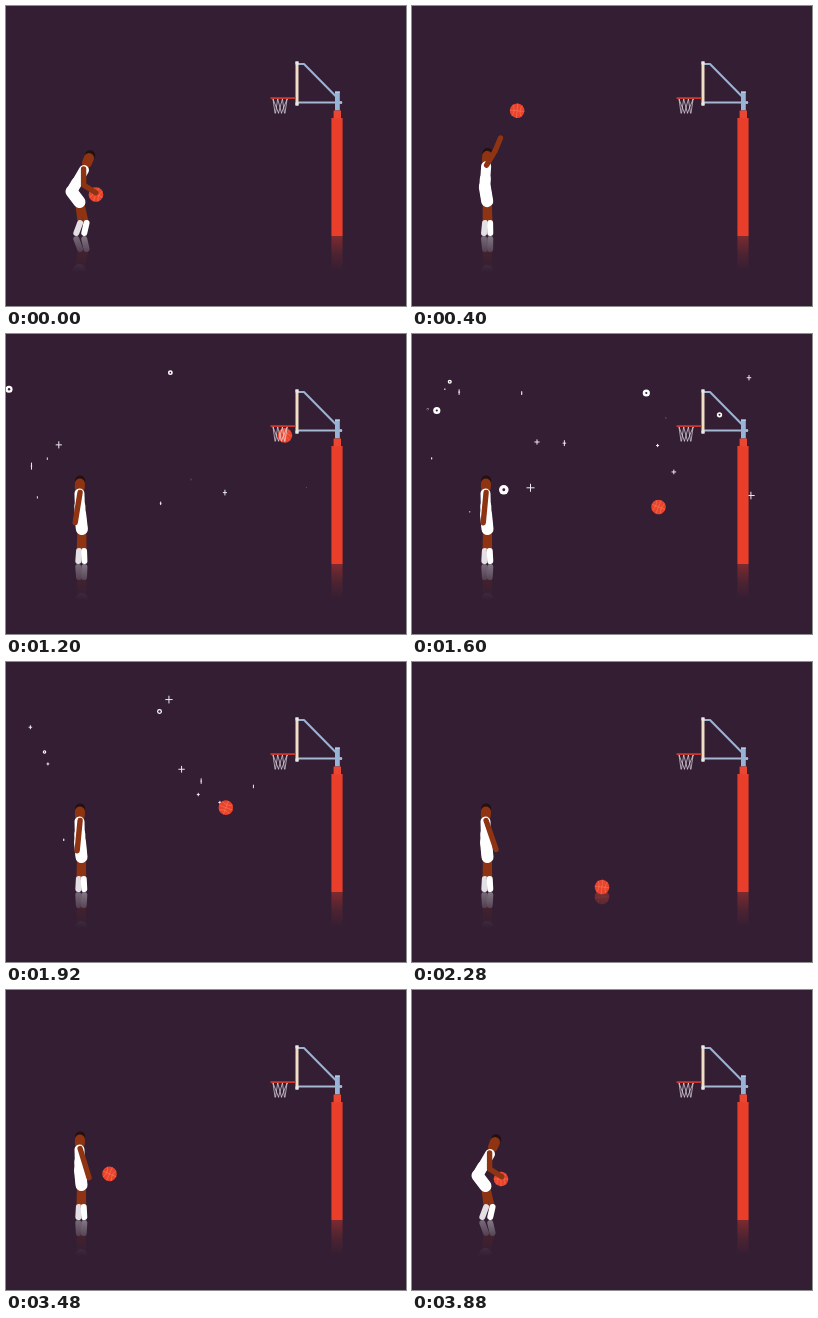
These frames come from a looping animation (400 px wide and 300 px high, 3.96 s). An HTML page with a canvas:

```html
<!DOCTYPE html>
<html lang="en">
<head>
<meta charset="utf-8">
<title>Free throw</title>
<style>
html, body { margin: 0; width: 100%; height: 100%; overflow: hidden; background: #331e33; }
canvas { display: block; width: 400px; height: 300px; }
</style>
</head>
<body>
<canvas id="stage" width="400" height="300"></canvas>
<script>
const ctx = document.getElementById('stage').getContext('2d');
const LOOP = 3960, STEP = 40, FLOOR = 230;
const RELEASE = 340, HIT = 1185, LAND = 1430, CATCH = 3560;
const GRAVITY = .0009;
const BG = '#331e33', RED = '#e83e2a', SKIN = '#8f3413', HAIR = '#24100f';
const WHITE = '#ffffff', STEEL = '#97b3d6';

const mix = (a, b, k) => a + (b - a) * k;
// Eased 0 to 1 between two times.
function ramp(t, from, to) {
  const k = Math.max(0, Math.min(1, (t - from) / (to - from)));
  return k * k * (3 - 2 * k);
}

function stroke(color, width, points, cap = 'round') {
  ctx.strokeStyle = color;
  ctx.lineWidth = width;
  ctx.lineCap = cap;
  ctx.lineJoin = 'round';
  ctx.beginPath();
  points.forEach(([x, y]) => ctx.lineTo(x, y));
  ctx.stroke();
}

function rect(color, x, y, w, h) {
  ctx.fillStyle = color;
  ctx.fillRect(x, y, w, h);
}

function disc(color, x, y, r) {
  ctx.fillStyle = color;
  ctx.beginPath();
  ctx.arc(x, y, r, 0, Math.PI * 2);
  ctx.fill();
}

function armAngle(t) {
  const lowered = ramp(t, 480, 800);
  const raised = ramp(t, 60, RELEASE) * (1 - lowered);
  const swing = Math.cos((t - 2280) / 1120 * Math.PI * 2) * ramp(t, 1500, 2200);
  const rest = -.16 * lowered * (1 - ramp(t, 1200, 2000));
  return (2.6 * raised + rest + .33 * swing) * (1 - ramp(t, 3480, 3760));
}

function drawPlayer(t) {
  const crouch = 1 - ramp(t, 80, 500) + ramp(t, 3480, 3760);
  const sway = ramp(t, 400, 760) * (1 - ramp(t, 840, 1280));
  // A standing joint, with its shift when crouching and when swaying.
  const joint = (x, y, crouchX, crouchY, swayX) =>
    [x + crouch * crouchX + sway * swayX, y + crouch * crouchY];

  const head = joint(74, 149.5, 9, 2.5, -.5);
  const chest = joint(73.5, 159.5, 4.5, 4.5, -.5);
  const hip = joint(74, 180, -8.5, 5.5, 1.5);
  const thigh = joint(75.5, 195, -2, 1, 4.5);
  const ankle = joint(75.3, 217, 2, 0, 3);
  const foot = joint(75.3, 227, -1, 0, .7);
  const spread = 2.7 + .9 * Math.max(crouch, sway);

  for (const side of [-1, 1]) {
    const dx = side * spread;
    stroke(SKIN, 5.4, [[thigh[0] + side * 1.8, thigh[1]], [ankle[0] + dx * .8, ankle[1]]]);
    stroke(side < 0 ? '#e3dfe4' : WHITE, 6,
      [[ankle[0] + dx * .9, ankle[1]], [foot[0] + dx * 1.1, foot[1]]]);
  }

  const lean = Math.atan2(head[0] - chest[0], chest[1] - head[1]);
  disc(HAIR, head[0] + 2.8 * Math.sin(lean), head[1] - 2.8 * Math.cos(lean), 5.1);
  stroke(SKIN, 10, [[mix(head[0], chest[0], .4), mix(head[1], chest[1], .4)], head]);

  stroke(WHITE, 10, [chest, hip]);
  stroke(WHITE, 12, [hip, thigh]);
  stroke(WHITE, 11, [[mix(chest[0], hip[0], .6), mix(chest[1], hip[1], .6)], hip, thigh]);

  const shoulder = [chest[0] + .6 - crouch, chest[1] - 1];
  const angle = armAngle(t), bend = angle + crouch;
  const elbow = [shoulder[0] + 16 * Math.sin(angle), shoulder[1] + 16 * Math.cos(angle)];
  const hand = [elbow[0] + 14.5 * Math.sin(bend), elbow[1] + 14.5 * Math.cos(bend)];
  stroke(SKIN, 5.4, [shoulder, elbow, hand]);
}

// Sideways roll after the rebound, slowing down gradually.
function driftX(t) {
  const s = (t - 1600) / 1000;
  return 246.5 - s * (82.75 + 2.81 * s - 3.39 * s * s);
}

function flightX(t) {
  return 193.5 + .221 * (t - 800);
}

function flightY(t) {
  return 26 + .00048 * (t - 805) ** 2;
}

function bounceY(t) {
  let start = LAND, span = 850;
  while (t >= start + span) {
    start += span;
    span *= .878;
  }
  return 225 - GRAVITY / 2 * (t - start) * (start + span - t);
}

function ballAt(t) {
  if (t < RELEASE) {
    const k = Math.max(0, (t - 80) / (RELEASE - 80));
    return [mix(90, flightX(RELEASE), k), mix(188.5, flightY(RELEASE), k * (.4 + .6 * k))];
  }
  if (t < HIT) return [flightX(t), flightY(t)];
  if (t < LAND) {
    const d = t - HIT;
    return [driftX(t), 95 + .42 * d + GRAVITY / 2 * d * d];
  }
  const held = ramp(t, CATCH, 3800), free = Math.min(t, CATCH);
  return [mix(driftX(free), 89, held), mix(bounceY(free), 189, held)];
}

function drawBall(t) {
  const [x, y] = ballAt(t);
  const free = Math.max(0, Math.min(t, CATCH) - RELEASE);
  ctx.save();
  ctx.translate(x, y);
  ctx.rotate(.4 - free * .005);
  disc('#ea432b', 0, 0, 7.3);
  ctx.strokeStyle = 'rgba(255,165,130,.42)';
  ctx.lineWidth = .7;
  ctx.beginPath();
  ctx.moveTo(-7, 0);
  ctx.lineTo(7, 0);
  ctx.moveTo(0, -7);
  ctx.lineTo(0, 7);
  for (const s of [-1, 1]) {
    ctx.moveTo(s * 4.6, -5.4);
    ctx.quadraticCurveTo(s * 1.2, 0, s * 4.6, 5.4);
  }
  ctx.stroke();
  ctx.restore();
}

function drawPole() {
  rect(RED, 325.4, 112, 11.2, FLOOR - 112);
  rect('#ea4733', 327.6, 104.5, 7.4, 8);
}

function drawHoop() {
  stroke(STEEL, 2.1, [[292, 58], [298, 58], [331, 91.5]], 'butt');
  stroke('#a3b8d2', 2, [[292, 96.5], [336, 96.5]], 'butt');
  rect(STEEL, 329, 85.5, 4.8, 19);
  rect('#b2cce6', 329, 85.5, 4.8, 1.5);
  disc('#a3b8d2', 334.7, 96.5, 1.6);
  drawPole();
  rect('#f0dec5', 289.5, 55.5, 3, 44);
  rect('#e6e9ee', 289.5, 55.5, 3, 3);
  rect('#e6e9ee', 289.5, 96.5, 3, 3);
  for (let i = 0; i < 4; i++) {
    const top = 267 + i * 4.7, low = 269.5 + i * 3;
    for (const slant of [-3, 3]) {
      const x = Math.max(269, Math.min(279, low + slant));
      stroke('rgba(235,228,238,.75)', .9, [[top, 93], [x, 107]]);
    }
  }
  rect('#dc3b2b', 264.5, 91.3, 25, 1.6);
}

let seed = 17;
const random = () => (seed = (seed * 16807) % 2147483647) / 2147483647;

// Camera flashes in the dark: a few bright ones, then a scatter.
const flashes = [[24.8, 76.5, 3.6], [234.3, 59, 3.6], [91.8, 155.8, 4.8], [118.5, 153.8, 4], [125, 108, 2.6]]
  .map(([x, y, size], i) => ({ x, y, size, peak: 1600, ring: i < 3, phase: 0 }));
for (let i = 0; i < 36; i++) {
  const peak = 1170 + i * 24;
  const late = peak > 1600;
  flashes.push({
    x: late ? 14 + random() * 326 : 3 + random() * 394,
    y: (late ? 27 : 18) + random() * 158,
    size: 1.6 + random() * 2.4,
    peak,
    ring: i % 4 === 0,
    phase: random() * Math.PI
  });
}

function drawFlash({ x, y, size, peak, ring, phase }, t) {
  const age = (t - peak) / 190;
  if (Math.abs(age) >= 1) return;
  const r = size * Math.cos(age * Math.PI / 2);
  if (ring) {
    disc(WHITE, x, y, r);
    disc(BG, x, y, size * (.3 + .2 * Math.max(0, age)));
    return;
  }
  const w = r * Math.abs(Math.cos(age * 2.4 + phase));
  stroke('#efe9f1', 1, [[x, y - r], [x, y + r]], 'butt');
  if (w > .4) stroke('#efe9f1', 1, [[x - w, y], [x + w, y]], 'butt');
}

function drawActors(t) {
  drawBall(t);
  drawPlayer(t);
}

function drawReflection(t) {
  ctx.save();
  ctx.beginPath();
  ctx.rect(0, FLOOR, 400, 37);
  ctx.clip();
  ctx.translate(0, FLOOR * 2);
  ctx.scale(1, -1);
  drawPole();
  drawActors(t);
  ctx.restore();
  const fade = ctx.createLinearGradient(0, FLOOR, 0, FLOOR + 36);
  fade.addColorStop(0, 'rgba(51,30,51,.6)');
  fade.addColorStop(.5, 'rgba(51,30,51,.86)');
  fade.addColorStop(1, BG);
  rect(fade, 0, FLOOR, 400, 38);
}

function draw(now) {
  const t = Math.min(LOOP - 2 * STEP, Math.floor((now % LOOP) / STEP) * STEP);
  rect(BG, 0, 0, 400, 300);
  drawReflection(t);
  flashes.forEach(flash => drawFlash(flash, t));
  drawActors(t);
  drawHoop();
}

let start;
function tick(now) {
  start ??= now;
  draw(now - start);
  requestAnimationFrame(tick);
}
draw(0);
requestAnimationFrame(tick);
</script>
</body>
</html>
```
